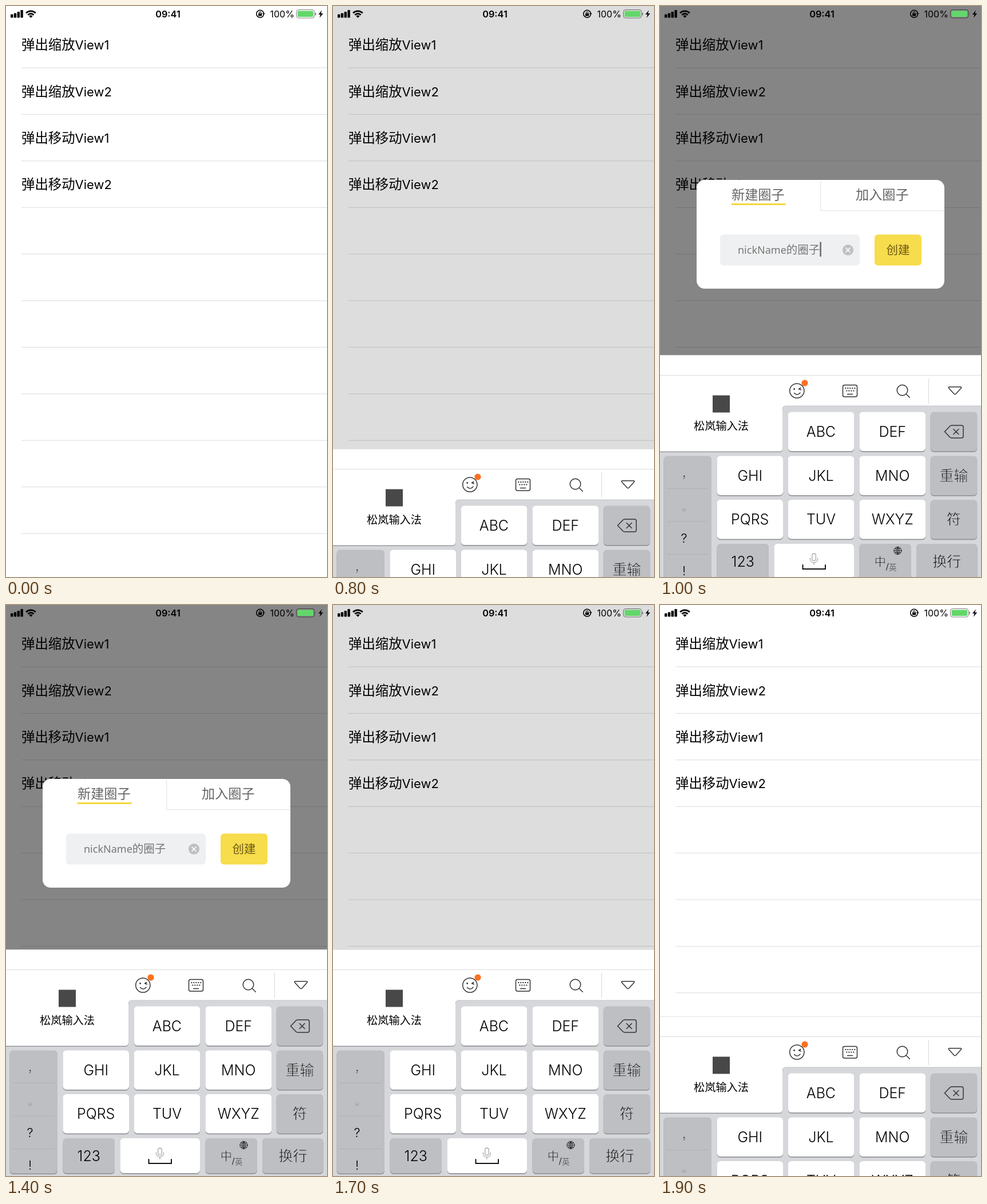
Animation, 561 px wide and 998 px high, one loop 2000 ms. Source, as an HTML page:

```html
<!DOCTYPE html>
<html lang="zh-CN">
<head>
<meta charset="utf-8">
<style>
  html, body { margin: 0; width: 100%; height: 100%; overflow: hidden; background: #fff; }
  svg { display: block; font-family: Inter, "Noto Sans CJK SC", "Noto Sans CJK", sans-serif; }
  .mid { text-anchor: middle; }
  .key { font-size: 25px; font-weight: 300; text-anchor: middle; }
  .thin { stroke: #bdbfc2; stroke-width: 0.8; }
  .icon { fill: none; stroke: #333; stroke-width: 1.5; stroke-linejoin: round; stroke-linecap: round; }
</style>
</head>
<body>
<svg id="stage" width="561" height="998" viewBox="0 0 561 998"></svg>
<script>
const LOOP = 2000, STEP = 100;
const KEYS_TOP = 602, KEYS_HEIGHT = 396, DIM = 0.48;

const rect = (x, y, w, h, fill, r = 0) =>
  `<rect x="${x}" y="${y}" width="${w}" height="${h}" rx="${r}" fill="${fill}"/>`;
const text = (x, y, s, attrs = '') => `<text x="${x}" y="${y}" ${attrs}>${s}</text>`;
const path = (d, attrs = '') => `<path class="icon" d="${d}" ${attrs}/>`;
const circle = (x, y, r, attrs = '') => `<circle cx="${x}" cy="${y}" r="${r}" ${attrs}/>`;

function list() {
  let out = '<g id="selected">' + rect(0, 27, 561, 81.5, '#d8d8da') + '</g>';
  for (let i = 0; i < 11; i++) out += rect(27, 107.5 + 81.4 * i, 534, 1, '#dcdcde');
  ['弹出缩放|View1', '弹出缩放|View2', '弹出移动|View1', '弹出移动|View2'].forEach((s, i) => {
    const [han, latin] = s.split('|');
    out += text(27, 76.2 + 81.4 * i, `${han}<tspan font-size="22">${latin}</tspan>`, 'font-size="23.4"');
  });
  return out;
}

function statusBar() {
  let out = '';
  [6, 8, 10.5, 13.5].forEach((h, i) => out += rect(8 + 5.8 * i, 20.5 - h, 4.4, h, '#000', 1));
  out += '<g fill="none" stroke="#000" stroke-width="2.7">' +
    '<path d="M35 12.3a12 12 0 0 1 16.8 0M38.2 15.6a7.4 7.4 0 0 1 10.4 0"/></g>' +
    '<path d="M40.2 17.6a4.6 4.6 0 0 1 6.4 0l-3.2 3.2z"/>';
  out += text(283, 20, '09:41', 'class="mid" font-size="16.3" font-weight="600"');
  out += path('M450.3 15.5a6.4 6.4 0 1 1 0-3.5', 'style="stroke:#000"') +
    '<path d="M447.8 12.6h5l-2.5 3.2z"/>' + rect(441, 13, 6.2, 4.6, '#000', 0.6) +
    path('M442.5 13v-1.4a1.6 1.6 0 0 1 3.2 0v1.4', 'style="stroke:#000;stroke-width:1.1"');
  out += text(461.5, 20, '100%', 'font-size="16"');
  out += '<rect x="507.5" y="6.5" width="31.5" height="14.5" rx="4" fill="none" stroke="#000" stroke-opacity="0.5"/>' +
    rect(509.5, 8.5, 27.5, 10.5, '#63d76a', 2) + rect(540.2, 11.5, 1.6, 5, '#777', 0.8);
  return out + '<path d="M552 7.5l-6 7.2h3.6l-1.6 6 6.2-7.6h-3.8z"/>';
}

function popup() {
  return rect(64, 304, 433, 190, '#fff', 14) +
    rect(280, 306, 1.3, 52, '#e6e6e8') + rect(280, 357, 217, 1.3, '#e6e6e8') +
    '<g fill="#666" font-size="23.2">' + text(125, 338, '新建圈子') + text(342, 338, '加入圈子') + '</g>' +
    rect(125, 345, 94.5, 3, '#f6d63f') +
    rect(105, 399.5, 244, 54, '#eff0f1', 6) +
    text(136, 433, '<tspan font-family="Noto Sans, sans-serif" font-size="18">nickName</tspan>的圈子',
      'fill="#777" font-size="19.5"') +
    '<g id="caret">' + rect(279.3, 412.5, 2.6, 25.5, '#6d6d75') + '</g>' +
    circle(328.5, 426.5, 9.6, 'fill="#bfc0c3"') +
    path('M325 423l7 7m0-7l-7 7', 'style="stroke:#fff;stroke-width:1.7"') +
    rect(375, 399.5, 82, 54, '#f7dc4b', 6) +
    text(416, 434, '创建', 'class="mid" fill="#6e5816" font-size="20.5"');
}

function key(x, y, w, label = '', dark = false, h = 68.5) {
  const han = /[^\x00-\x7f]/.test(label);
  return rect(x, y + 1.7, w, h, '#949599', 6) + rect(x, y, w, h, dark ? '#bdbfc2' : '#fff', 6) +
    text(x + w / 2, y + h / 2 + 9, label, `class="key ${han ? 'thin' : ''}"`);
}

function toolbar() {
  let out = circle(239.3, 62.5, 12.6, 'class="icon"') +
    path('M234.5 66.5q5.5 5.5 10.5-.5M246 57.5l-3.5 2 3.8 1.3') +
    circle(234.6, 59.5, 1.4, 'fill="#333"') + circle(253, 49, 5.6, 'fill="#fc7021"');
  out += '<rect class="icon" x="319.5" y="52.5" width="25" height="20.5" rx="3"/>' + path('M327.5 68.5h9');
  for (let i = 0; i < 9; i++)
    out += rect(323.3 + (i % 5) * 4 + (i > 4 ? 2 : 0), i > 4 ? 61.5 : 57, 2, 2, '#333');
  return out + circle(423.5, 61.5, 9.3, 'class="icon"') + path('M430.3 68.3l6 6') +
    rect(469, 41, 1, 44, '#d8d8da') + path('M505.5 55.8h20q2 .5.8 2l-9 10q-1.8 1.6-3.6 0l-9-10q-1.2-1.5.8-2z');
}

function keyboard() {
  const [r1, r2, r3, r4] = [99.5, 176.5, 253, 330];
  const cols = [99.5, 223.7, 348.5];
  let out = rect(0, 0, 561, 400, '#fff') + rect(0, 0, 561, 1, '#e4e4e6') + rect(0, 35, 561, 1, '#dcdcde') +
    '<path d="M214 95q0-6 6-6H561V400H0V160H214z" fill="#d6d7da"/>' +
    path('M214 95q0-6 6-6H561', 'style="stroke:#c3c4c7;stroke-width:1"') +
    '<path d="M0 160H214v4q0 6-6 6H0z" fill="#97989b"/><path d="M0 100H214v62.5q0 6-6 6H0z" fill="#fff"/>';
  out += rect(92, 70.5, 30, 30, '#484848') +
    text(107, 130.5, '松岚输入法', 'class="mid" font-size="19.2"') + toolbar();

  out += key(cols[1], r1, 115.5, 'ABC') + key(cols[2], r1, 115.5, 'DEF');
  ['GHI', 'JKL', 'MNO', 'PQRS', 'TUV', 'WXYZ'].forEach((s, i) =>
    out += key(cols[i % 3], i < 3 ? r2 : r3, 115.5, s));
  ['', '重输', '符'].forEach((s, i) => out += key(472.7, [r1, r2, r3][i], 81.5, s, true));
  out += path('M497.5 134l9-9.5q1.5-1.5 3.5-1.5h17q3 0 3 3v16q0 3-3 3h-17q-2 0-3.5-1.5zM513 129.5l9 9m0-9l-9 9');

  out += key(6.5, r2, 83.5, '', true, 215);
  [233, 290.5, 348].forEach(y => out += rect(12, y, 73, 1, '#b0b1b5'));
  out += '<g class="key" style="font-size:19px">' + text(47, 215, '，', 'class="thin"') +
    text(48, 272, '。', 'class="thin"') + '</g>' +
    '<g class="key" style="font-size:22px">' + text(42, 328, '?') + text(42, 385, '!') + '</g>';

  out += key(99.5, r4, 90.5, '123', true, 61) + key(199.5, r4, 139.5, '', false, 61) +
    key(348.5, r4, 90.5, '', true, 61) + key(448, r4, 106.5, '换行', true, 61);
  out += '<rect x="265.7" y="347" width="6.6" height="12.5" rx="3.3" fill="none" stroke="#aaa" stroke-width="1.3"/>' +
    path('M262.5 355v1.5a6.5 6.5 0 0 0 13 0V355M269 363v3.5', 'style="stroke:#aaa;stroke-width:1.3"') +
    path('M249.5 367v7h39.5v-7', 'style="stroke:#111;stroke-width:2;stroke-linejoin:miter"');
  out += text(374.5, 369, '中', 'class="thin" font-size="20.5"') +
    path('M395.5 376l3.5-12', 'style="stroke-width:1.2"') +
    text(400, 375.5, '英', 'font-size="13.5" fill="#666"');
  const globe = 'style="stroke:#222;stroke-width:1"';
  return out + circle(415.5, 342, 6.6, 'class="icon" ' + globe) +
    path('M409 342h13M415.5 335.4v13.2M410.5 338.5h10M410.5 345.5h10M415.5 335.4q-6 6.6 0 13.2q6-6.6 0-13.2', globe);
}

const $ = id => document.getElementById(id);
$('stage').innerHTML = list() +
  '<g id="dim">' + rect(0, 0, 561, 998, '#000') + '</g>' + statusBar() +
  '<g id="popup">' + popup() + '</g><g id="keys">' + keyboard() + '</g>';

const clamp = v => Math.min(1, Math.max(0, v));
const ease = v => (v = clamp(v), v * v * (3 - 2 * v));
// Critically damped spring: 0 to 1, time in ms.
const spring = ms => {
  const x = Math.max(0, ms) * 0.0195;
  return 1 - (1 + x) * Math.exp(-x);
};

function draw(now) {
  const t = Math.floor(now % LOOP / STEP) * STEP;
  const dim = ease((t - 695) / 300) - ease((t - 1505) / 300);
  const scale = ease((t - 800) / 140) - ease((t - 1500) / 200);
  const shown = spring(t - 702.5) - spring(t - 1844.5);
  const keysY = Math.round(KEYS_TOP + KEYS_HEIGHT * (1 - shown));

  $('selected').style.display = t === 700 ? '' : 'none';
  $('dim').setAttribute('opacity', DIM * dim);
  $('popup').style.display = scale > 0 ? '' : 'none';
  $('popup').setAttribute('transform', `translate(280.5 399) scale(${scale}) translate(-280.5 -399)`);
  $('caret').setAttribute('opacity', clamp((1400 - t) / 200));
  $('keys').setAttribute('transform', `translate(0 ${keysY})`);
}

function loop() {
  draw(performance.now());
  requestAnimationFrame(loop);
}
loop();
</script>
</body>
</html>
```
